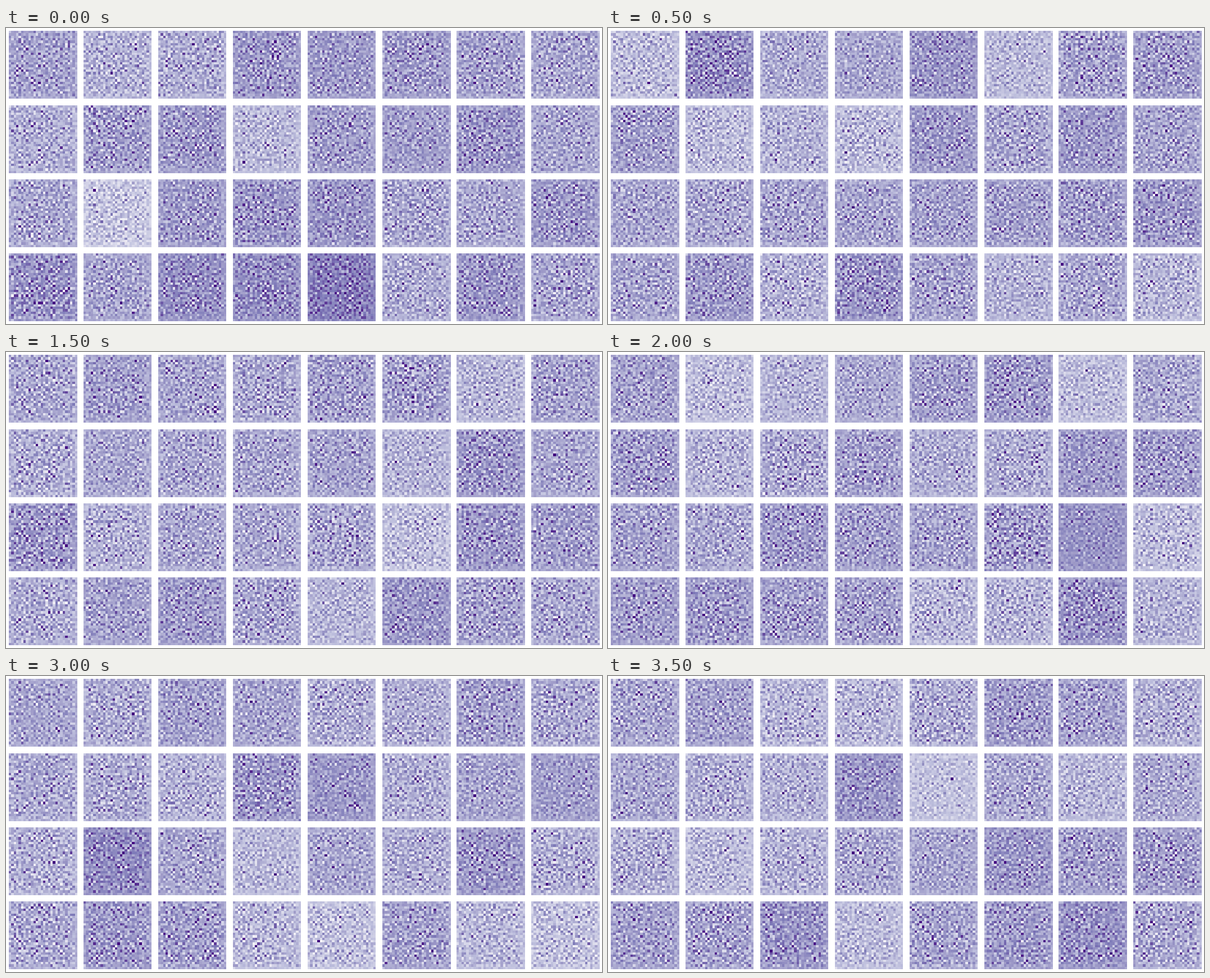
A matplotlib script that plays this animation: 1061 px wide and 528 px high, repeating every 4000 ms.

```python
import matplotlib.pyplot as plt
import numpy as np
from matplotlib.animation import FuncAnimation

W, H, DPI = 1061, 528, 100
ROWS, COLS, N = 4, 8, 28
FRAMES, INTERVAL = 8, 500
TILE, PITCH_X, PITCH_Y = 121.3, 132.85, 132.3

# Contrast falls off near the borders, more at the right and bottom
I = np.arange(N)
EDGE = (1 - 0.4 * np.exp(-I / 1.2)) * (1 - 0.65 * np.exp(-(N - 1 - I) / 1.8))
FADE = np.minimum.outer(EDGE, EDGE)


def blur(a):
    """Mean of the four neighbours."""
    return sum(np.roll(a, s, axis) for s in (1, -1) for axis in (0, 1)) / 4


def noise_tile(rng):
    """Checkered grain with calm and busy patches, scaled to 0..1."""
    grain = rng.normal(size=(N, N))
    grain -= 0.8 * blur(grain)
    grain /= grain.std()
    patches = rng.normal(size=(N, N))
    for _ in range(6):
        patches = blur(patches)
    gain = 1 + 0.12 * patches / patches.std()
    v = FADE * gain * (grain + 0.03 * grain**2) - 0.4 * (1 - FADE)
    return (v - v.min()) / np.ptp(v)


def span(start, pitch, k):
    a = start + pitch * k
    return round(a), round(a + TILE)


fig = plt.figure(figsize=(W / DPI, H / DPI), dpi=DPI, facecolor="white")
images = []
for r in range(ROWS):
    top, bottom = span(5.2, PITCH_Y, r)
    for c in range(COLS):
        left, right = span(5.3, PITCH_X, c)
        ax = fig.add_axes([left / W, 1 - bottom / H,
                           (right - left) / W, (bottom - top) / H])
        ax.axis("off")
        images.append(ax.imshow(np.zeros((N, N)), cmap="Purples", vmin=0,
                                vmax=1, interpolation="nearest",
                                aspect="auto"))


def update(step):
    rng = np.random.default_rng(100 + step)
    for image in images:
        image.set_data(noise_tile(rng))
    return images


anim = FuncAnimation(fig, update, frames=FRAMES, interval=INTERVAL,
                     repeat=True, repeat_delay=0, blit=False)
plt.show()
```
